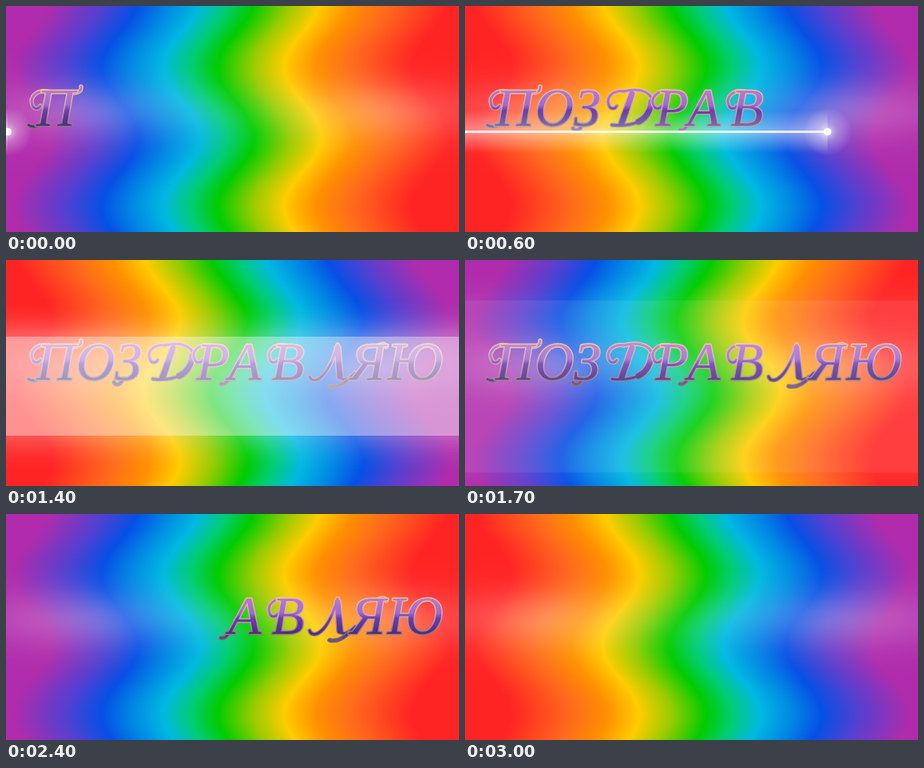
Recreate the animation shown at these times as an HTML page with a canvas. Size 567 px wide and 283 px high, loop 3200 ms.

```html
<!DOCTYPE html>
<html lang="ru">
<head>
<meta charset="utf-8">
<title>Поздравляю</title>
<style>
  html, body { margin: 0; width: 100%; height: 100%; overflow: hidden; }
  #stage { position: relative; width: 567px; height: 283px; overflow: hidden; }
  #stage > * { position: absolute; left: 0; top: 0; }

  #sky { animation: flip 400ms -2ms step-end infinite; }
  @keyframes flip { 0% { transform: scaleX(-1); } 50%, 100% { transform: none; } }

  .letter { animation: show 3200ms calc(100ms * var(--i) - 3202ms) step-end infinite; }
  @keyframes show { 0% { visibility: visible; } 62.5%, 100% { visibility: hidden; } }
  .letter text {
    font: italic 67px "Liberation Serif", "Times New Roman", serif;
    text-anchor: middle;
    fill: url(#ink);
    stroke: url(#gold);
    stroke-width: 3px;
    stroke-linejoin: round;
    paint-order: stroke;
  }
  .letter path { fill: none; stroke-linecap: round; stroke-linejoin: round; }
  .rim { stroke: url(#gold); }
  .core { stroke: url(#ink); }
  .rim.thin { stroke-width: 5.5px; }
  .core.thin { stroke-width: 3px; }
  .rim.thick { stroke-width: 9.5px; }
  .core.thick { stroke-width: 7px; }

  #spark { animation: fly 3200ms -2ms infinite; }
  @keyframes fly {
    0% { transform: none; visibility: visible; animation-timing-function: steps(10); }
    31.25% { transform: translateX(753px); visibility: hidden; animation-timing-function: step-end; }
    100% { transform: translateX(753px); visibility: hidden; }
  }

  #stage > #band {
    left: -60px; top: 158px; width: 690px; height: 3px;
    background: #fff;
    box-shadow: 0 0 34px 8px rgba(255, 255, 255, .65);
    transform: translateY(-50%);
    animation: open 3200ms -2ms infinite;
  }
  @keyframes open {
    0% { height: 3px; opacity: 0; animation-timing-function: step-end; }
    31.25% { height: 3px; opacity: 1; animation-timing-function: steps(8); }
    56.25%, 100% { height: 245px; opacity: 0; }
  }
</style>
</head>
<body>
<div id="stage">
  <canvas id="sky" width="567" height="283"></canvas>
  <svg id="word" width="567" height="283" role="img" aria-label="ПОЗДРАВЛЯЮ">
    <defs>
      <linearGradient id="ink" gradientUnits="userSpaceOnUse" x1="0" y1="103" x2="0" y2="158">
        <stop offset="0" stop-color="#bd78d6"/>
        <stop offset=".38" stop-color="#a06bd0"/>
        <stop offset=".5" stop-color="#6a3fae"/>
        <stop offset=".85" stop-color="#4c2c86"/>
        <stop offset="1" stop-color="#6b5580"/>
      </linearGradient>
      <linearGradient id="gold" gradientUnits="userSpaceOnUse" x1="0" y1="100" x2="0" y2="160">
        <stop offset="0" stop-color="#f2c983"/>
        <stop offset=".45" stop-color="#d3a5a8"/>
        <stop offset="1" stop-color="#75606a"/>
      </linearGradient>
    </defs>
  </svg>
  <svg width="567" height="283">
    <defs>
      <radialGradient id="halo">
        <stop offset="0" stop-color="#fff" stop-opacity=".7"/>
        <stop offset=".4" stop-color="#fff" stop-opacity=".28"/>
        <stop offset="1" stop-color="#fff" stop-opacity="0"/>
      </radialGradient>
      <linearGradient id="trail" x2="0" y2="1">
        <stop offset="0" stop-color="#fff" stop-opacity="0"/>
        <stop offset=".5" stop-color="#fff" stop-opacity=".42"/>
        <stop offset="1" stop-color="#fff" stop-opacity="0"/>
      </linearGradient>
    </defs>
    <g id="spark">
      <rect x="-800" y="131" width="802" height="53" fill="url(#trail)"/>
      <rect x="-800" y="156" width="802" height="3" fill="#fff" fill-opacity=".8"/>
      <circle cx="2" cy="157.500" r="31" fill="url(#halo)"/>
      <circle cx="2" cy="157.500" r="4.800" fill="#fff"/>
    </g>
  </svg>
  <div id="band"></div>
</div>
<script>
  const sky = document.getElementById('sky').getContext('2d');
  const stops = [
    [35, '#ff2424'], [110, '#ff6a1c'], [155, '#ff9000'], [195, '#ffcc00'],
    [234, '#9acc00'], [279, '#00cc00'], [313, '#00cc78'], [347, '#00b8e2'],
    [386, '#0088e4'], [424, '#0650e4'], [470, '#5640d0'], [535, '#b02cac']
  ];
  const bell = (v, mid, width) => Math.exp(-(((v - mid) / width) ** 2));

  for (let y = 0; y < 283; y++) {
    const shift = 23 * Math.cos((y - 76) * 2 * Math.PI / 175);
    const fill = sky.createLinearGradient(shift, 0, shift + 567, 0);
    stops.forEach(([x, color]) => fill.addColorStop(x / 567, color));
    sky.fillStyle = fill;
    sky.fillRect(0, y, 567, 1);

    // soft sheen, strongest towards both sides
    const sheen = sky.createLinearGradient(0, 0, 567, 0);
    for (let k = 0; k <= 20; k++) {
      const x = k / 20 * 567;
      const side = bell(x, 95, 95) + bell(x, 460, 95);
      const alpha = (0.08 + 0.17 * side) * bell(y, 131, 36);
      sheen.addColorStop(k / 20, `rgba(255,255,255,${alpha})`);
    }
    sky.fillStyle = sheen;
    sky.fillRect(0, y, 567, 1);
  }

  const curl = x => `M${x} 107c-14-3-24 7-20 17c2 6 8 5 10 1`;

  // letter, centre of its text if any, thin strokes, thick strokes
  const letters = [
    ['П', 62, curl(53) + 'M78 108C87 110 95 108 94 101M44 147C39 152 32 152 28 149'],
    ['О', 112],
    ['З', 153, 'M147 148C144 156 138 158 135 153'],
    ['Д', 0, curl(200) + 'M198 107C222 101 238 110 234 126C230 142 212 152 184 149', 'M209 110L196 147M233 120C232 134 224 142 217 145'],
    ['Р', 259, curl(256)],
    ['А', 299, 'M279 148C277 153 273 156 269 155'],
    ['В', 353, curl(350)],
    ['Л', 0, 'M415 106C408 130 400 144 391 149C386 152 381 150 380 146M419 148C424 151 428 149 431 146', 'M415 110L418 146'],
    ['Я', 453, 'M437 141C427 152 417 161 405 158M466 107C472 104 475 105 476 109'],
    ['Ю', 512]
  ];

  const pen = (kind, d) => d ? `<path class="${kind}" d="${d}"/>` : '';
  const glyph = ([char, x, thin, thick], i) =>
    `<g class="letter" style="--i:${i}">` +
    pen('rim thin', thin) + pen('rim thick', thick) +
    pen('core thin', thin) + pen('core thick', thick) +
    (x ? `<text x="${x}" y="150">${char}</text>` : '') + '</g>';

  document.getElementById('word').innerHTML += letters.map(glyph).join('');
</script>
</body>
</html>
```
